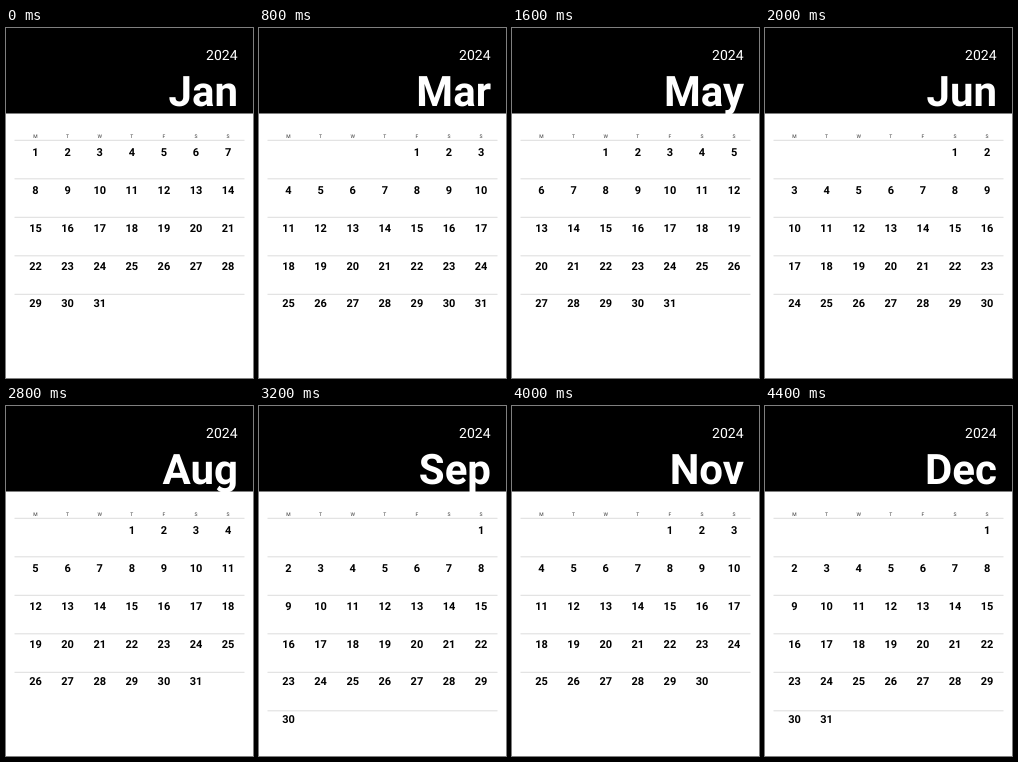
Recreate the animation shown at these times as an HTML page. Size 247 by 350 pixels, loop 4.8 s.

```html
<!DOCTYPE html>
<html lang="en">
<head>
<meta charset="utf-8">
<title>Calendar 2024</title>
<style>
html, body { margin: 0; width: 100%; height: 100%; overflow: hidden; background: #fff; }
svg { display: block; width: 100vw; height: 100vh; }
text { font-family: Roboto, sans-serif; text-rendering: geometricPrecision; }
.year, .month { fill: #fff; text-anchor: end; }
.year { font-size: 14px; }
.month { font-size: 42px; font-weight: 700; }
.label, .day { text-anchor: middle; }
.label { font-size: 5px; fill: #333; }
.day { font-size: 11px; font-weight: 700; fill: #000; }
.rule { stroke: #d4d4d4; stroke-width: .8; }
</style>
</head>
<body>
<svg viewBox="0 0 247 350">
  <rect width="247" height="350" fill="#fff"/>
  <rect width="247" height="85.5" fill="#000"/>
</svg>
<script>
const YEAR = 2024, STEP = 400;
const MONTHS = "Jan Feb Mar Apr May Jun Jul Aug Sep Oct Nov Dec".split(" ");
const svg = document.querySelector("svg");
const colX = c => 29.5 + c * 32.1;
const rowY = r => 128.1 + r * 37.8;

function add(tag, attrs, text = "") {
  const el = document.createElementNS("http://www.w3.org/2000/svg", tag);
  for (const key in attrs) el.setAttribute(key, attrs[key]);
  el.textContent = text;
  return svg.appendChild(el);
}

add("text", { class: "year", x: 231.6, y: 32 }, YEAR);
const title = add("text", { class: "month", x: 232, y: 77.6 });
[..."MTWTFSS"].forEach((d, c) => add("text", { class: "label", x: colX(c), y: 110 }, d));

const rules = [], cells = [];
for (let r = 0; r < 6; r++) {
  const y = 112.3 + r * 38.5;
  rules.push(add("line", { class: "rule", x1: 8.5, x2: 238.5, y1: y, y2: y }));
  for (let c = 0; c < 7; c++) cells.push(add("text", { class: "day", x: colX(c), y: rowY(r) }));
}

let shown = -1;
function draw(time) {
  const m = Math.floor(time / STEP) % 12;
  if (m === shown) return;
  shown = m;
  // Weeks start on Monday
  const lead = (new Date(YEAR, m, 1).getDay() + 6) % 7;
  const total = new Date(YEAR, m + 1, 0).getDate();
  title.textContent = MONTHS[m];
  cells.forEach((cell, i) => {
    const day = i - lead + 1;
    cell.textContent = day > 0 && day <= total ? day : "";
  });
  rules[5].setAttribute("visibility", lead + total > 35 ? "visible" : "hidden");
}

const start = performance.now();
function tick() {
  draw(performance.now() - start);
  requestAnimationFrame(tick);
}
tick();
</script>
</body>
</html>
```
